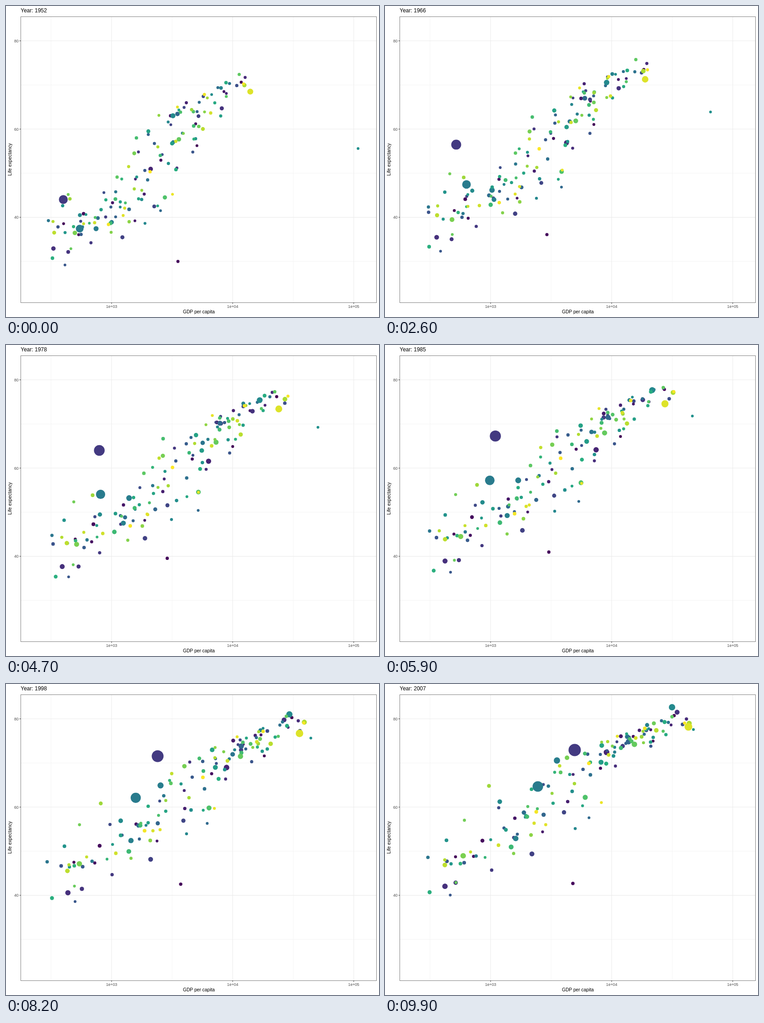
An HTML page for the animation above (10000 ms loop, 820 by 683 pixels).

```html
<!DOCTYPE html>
<html lang="en">
<head>
<meta charset="utf-8">
<title>Life expectancy and GDP per capita</title>
<style>
  html, body { margin: 0; width: 100%; height: 100%; overflow: hidden; background: #fff; }
  svg { display: block; font-family: "Liberation Sans", Arial, sans-serif; }
  .major { stroke: #ebebeb; stroke-width: 1.07; }
  .minor { stroke: #ebebeb; stroke-width: .53; }
  .tick { stroke: #333; stroke-width: 1; }
  .label { font-size: 8.7px; fill: #4d4d4d; }
  .axis { font-size: 10.3px; text-anchor: middle; }
</style>
</head>
<body>
<svg width="820" height="683">
  <clipPath id="panel"><rect x="32.5" y="23" width="782.5" height="628.3"/></clipPath>
  <g id="grid"></g>
  <g id="dots" clip-path="url(#panel)"></g>
  <rect x="32.5" y="23.5" width="782" height="628" fill="none" stroke="#7f7f7f"/>
  <g id="ticks"></g>
  <text id="year" x="32.3" y="14" font-size="12">Year: 1952</text>
  <text class="axis" x="424" y="675.3">GDP per capita</text>
  <text class="axis" transform="translate(12.3 337) rotate(-90)">Life expectancy</text>
</svg>
<script>
const COUNT = 142, FRAMES = 100, STEP = 100, NODES = 12, SEGMENT = 9;
const RAMP = ['#440154', '#472d7b', '#3b528b', '#2c728e', '#21918c', '#28ae80', '#5ec962', '#addc30', '#fde725']
  .map(c => [1, 3, 5].map(i => parseInt(c.slice(i, i + 2), 16)));

// Standout dots: population in millions, then a curve through three points.
const LEADERS = [
  { rank: 3, pop: 4, path: [[378, 561], [355, 465], [413, 438]] },
  { rank: 14, pop: 57, path: [[318, 358], [450, 250], [487, 150]] },
  { rank: 24, pop: 556, path: [[126, 425], [212, 224], [417, 145]] },
  { rank: 58, pop: 372, path: [[162, 489], [212, 321], [336, 225]] },
  { rank: 59, pop: 82, path: [[198, 489], [275, 328], [378, 168]] },
  { rank: 66, pop: 86, path: [[367, 241], [565, 116], [631, 51]] },
  { rank: 70, pop: .2, path: [[774, 313], [683, 175], [678, 100]] },
  { rank: 134, pop: 157, path: [[537, 188], [603, 138], [667, 94]] }
];

// Bands from a poorest to a richest end; each end moves from its first place to its last.
const REGIONS = [
  { n: 51, bend: 1.4, spread: 33, ease: 1.3, low: [[95, 505], [105, 415]], high: [[355, 425], [455, 255]] },
  { n: 28, bend: .85, spread: 30, ease: 1, low: [[120, 465], [215, 270]], high: [[455, 260], [635, 85]] },
  { n: 23, bend: .9, spread: 24, ease: 1.3, low: [[230, 400], [345, 205]], high: [[485, 190], [590, 100]] },
  { n: 32, bend: .7, spread: 13, ease: 1.5, low: [[265, 290], [425, 150]], high: [[530, 158], [665, 75]] }
];

const $ = id => document.getElementById(id);
const mix = (a, b, t) => a + (b - a) * t;
const blend = (p, q, t) => [mix(p[0], q[0], t), mix(p[1], q[1], t)];

let seed = 1952;
function random() {
  seed = (seed * 1664525 + 1013904223) % 4294967296;
  return seed / 4294967296;
}
const normal = () => (random() + random() + random() - 1.5) * 2;

function add(parent, tag, attrs, text = '') {
  const el = document.createElementNS('http://www.w3.org/2000/svg', tag);
  for (const key in attrs) el.setAttribute(key, attrs[key]);
  el.textContent = text;
  return parent.appendChild(el);
}

function colour(rank) {
  const p = rank / (COUNT - 1) * (RAMP.length - 1), i = Math.min(Math.floor(p), RAMP.length - 2);
  return `rgb(${RAMP[i].map((c, k) => Math.round(mix(c, RAMP[i + 1][k], p - i)))})`;
}

// Quadratic through a, b and c at the start, middle and end.
function curve([a, b, c], t) {
  return [0, 1].map(k => a[k] * (1 - 2 * t) * (1 - t) + b[k] * 4 * t * (1 - t) + c[k] * t * (2 * t - 1));
}

const times = Array.from({ length: NODES }, (_, i) => i / (NODES - 1));
const dots = LEADERS.map(({ rank, pop, path }) => ({ rank, pop, points: times.map(t => curve(path, t)) }));

const used = new Set(LEADERS.map(d => d.rank));
const ranks = Array.from({ length: COUNT }, (_, i) => i * 53 % COUNT).filter(r => !used.has(r));

for (const { n, bend, spread, ease, low, high } of REGIONS) {
  for (let i = 0; i < n; i++) {
    const u = Math.pow((i + random()) / n, bend);
    // A few dots lie far to the rich side of their band.
    const dx = normal() * 14 + 7 * Math.exp(1.1 * normal()) * (1 - .7 * u);
    const dy = normal() * spread * (1 - u * .4);
    let driftX = 0, driftY = 0;
    const points = times.map(t => {
      const e = 1 - Math.pow(1 - t, ease);
      const [x, y] = blend(blend(...low, e), blend(...high, e), u);
      driftX = driftX * .85 + normal() * 6;
      driftY = driftY * .85 + normal() * 3;
      return [x + dx + driftX, Math.max(62, y + dy + driftY)];
    });
    dots.push({ rank: ranks.pop(), pop: Math.min(50, 4 * Math.exp(1.2 * normal())), points });
  }
}

dots.sort((a, b) => a.rank - b.rank);
for (const d of dots) d.el = add($('dots'), 'circle', { fill: colour(d.rank) });

function line(parent, kind, x1, y1, x2, y2) {
  add(parent, 'line', { class: kind, x1, y1, x2, y2 });
}
const column = (kind, x) => line($('grid'), kind, x, 23, x, 651);
const row = (kind, y) => line($('grid'), kind, 32.5, y, 815, y);
for (let i = 0; i < 3; i++) {
  column('minor', 99 + i * 266.2);
  row('minor', 173.4 + i * 193.8);
}
['1e+03', '1e+04', '1e+05'].forEach((name, i) => {
  const x = 232.1 + i * 266.2;
  column('major', x);
  line($('ticks'), 'tick', x, 651.3, x, 654);
  add($('ticks'), 'text', { class: 'label', x, y: 663.3, 'text-anchor': 'middle' }, name);
});
[80, 60, 40].forEach((name, i) => {
  const y = 76.5 + i * 193.8;
  row('major', y);
  line($('ticks'), 'tick', 29.7, y, 32.5, y);
  add($('ticks'), 'text', { class: 'label', x: 27.7, y: y + 3.2, 'text-anchor': 'end' }, name);
});

function draw(f) {
  const t = f / (FRAMES - 1), node = Math.min(Math.floor(f / SEGMENT), NODES - 2);
  $('year').textContent = 'Year: ' + Math.round(mix(1952, 2007, t));
  for (const d of dots) {
    const [x, y] = blend(d.points[node], d.points[node + 1], f / SEGMENT - node);
    const pop = d.pop * (1 + 1.4 * t);
    d.el.setAttribute('cx', x.toFixed(2));
    d.el.setAttribute('cy', y.toFixed(2));
    d.el.setAttribute('r', (2.84 + 10.67 * Math.sqrt(pop / 1318)).toFixed(2));
  }
}

const start = performance.now();
let shown = -1;
function tick() {
  const f = Math.floor((performance.now() - start) / STEP) % FRAMES;
  if (f !== shown) draw(shown = f);
  requestAnimationFrame(tick);
}
tick();
</script>
</body>
</html>
```
